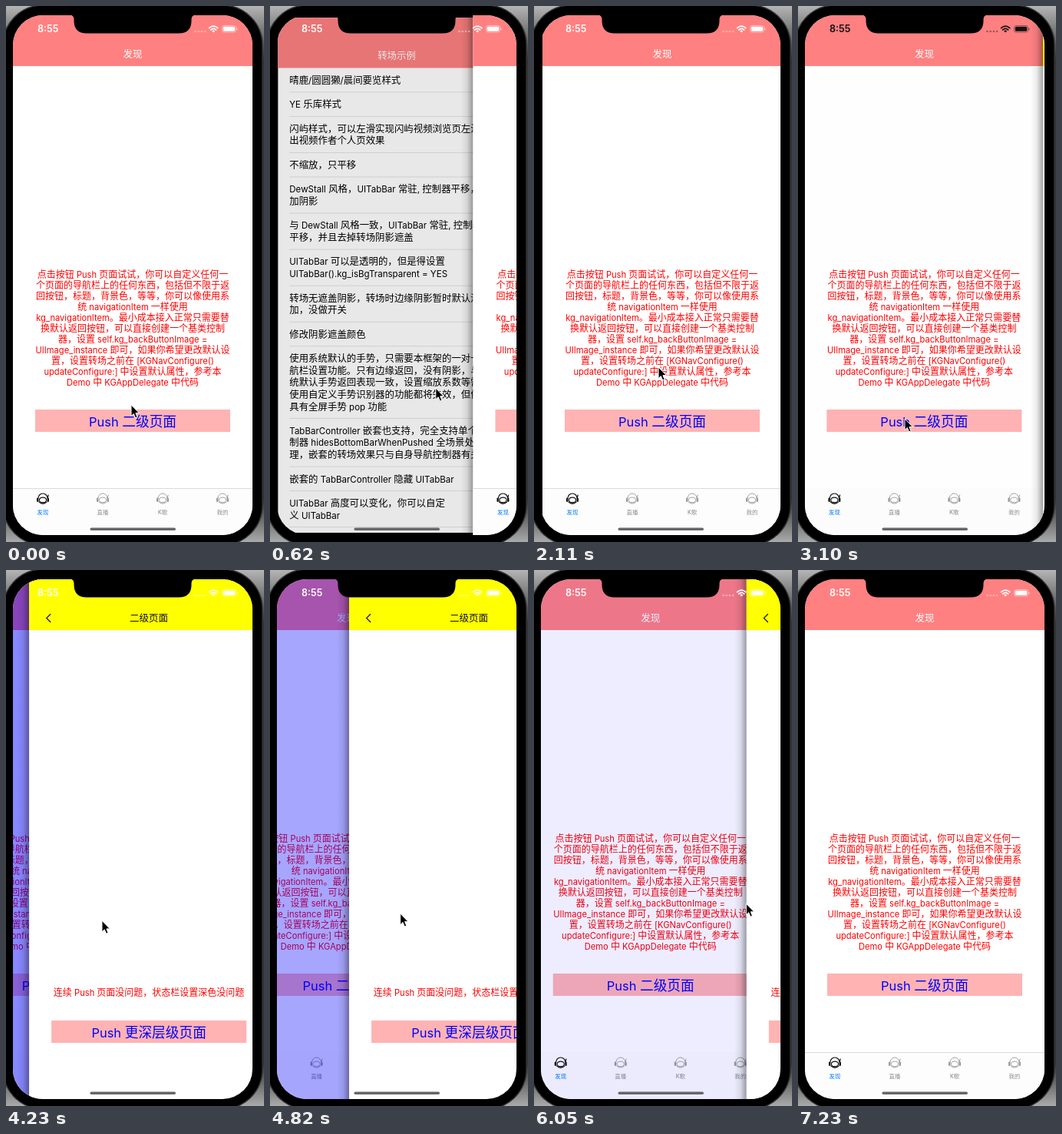
Recreate the animation shown at these times as an HTML page. Size 336 by 696 pixels, loop 7.33 s.

```html
<!DOCTYPE html>
<html lang="zh-CN">
<head>
<meta charset="utf-8">
<title>转场示例</title>
<style>
html, body { margin: 0; width: 100%; height: 100%; overflow: hidden; background: #333; }
svg { display: block; width: 336px; height: 696px; }
text { font-family: Inter, "Noto Sans CJK SC", "Noto Sans CJK", sans-serif; text-spacing-trim: space-all; white-space: pre; }
</style>
</head>
<body>
<svg id="stage" viewBox="0 0 336 696" xmlns="http://www.w3.org/2000/svg"></svg>
<script>
const LOOP = 7330, W = 312, PARALLAX = 0.3;
const RED = '#f00', CORAL = '#ff8080';

// ---- drawing helpers ----
const rect = (x, y, w, h, fill, more = '') =>
  `<rect x="${x}" y="${y}" width="${w}" height="${h}" fill="${fill}" ${more}/>`;

// y is the middle of the line; Latin runs are set a little smaller than Chinese
const text = (x, y, str, size, fill, more = 'text-anchor="middle"') => {
  const runs = str.replace(/[\x20-\x7e]+/g, m => `<tspan font-size="${size * 0.93}">${m}</tspan>`);
  return `<text x="${x}" y="${y + size * 0.37}" font-size="${size}" fill="${fill}" ${more}>${runs}</text>`;
};

const title = (str, fill) => text(165, 62, str, 12.5, fill, 'text-anchor="middle" font-weight="500"');
const line = (d, color, w) =>
  `<path d="${d}" fill="none" stroke="${color}" stroke-width="${w}" stroke-linecap="round" stroke-linejoin="round"/>`;
const button = (y, str) => rect(38, y, 254, 29, '#ffb3b3') + text(165, y + 15.2, str, 17.7, '#00f');

const page = (id, bar, shade, body) => `<g id="${id}">
  ${rect(-7, 12, 16, 675, 'url(#edge)')}
  ${rect(9, 12, W, 675, '#fff')}${rect(9, 12, W, 66, bar)}${body}
  ${rect(9, 12, W, 675, shade, `id="${id}Tint" opacity="0"`)}</g>`;

// ---- list page ----
const rows = [
  '晴鹿/圆圆獭/晨间要览样式',
  'YE 乐库样式',
  '闪屿样式，可以左滑实现闪屿视频浏览页左滑拉|出视频作者个人页效果',
  '不缩放，只平移',
  'DewStall 风格，UITabBar 常驻, 控制器平移，|加阴影',
  '与 DewStall 风格一致，UITabBar 常驻, 控制器|平移，并且去掉转场阴影遮盖',
  'UITabBar 可以是透明的，但是得设置|UITabBar().kg_isBgTransparent = YES',
  '转场无遮盖阴影，转场时边缘阴影暂时默认添|加，没做开关',
  '修改阴影遮盖颜色',
  '使用系统默认的手势，只需要本框架的一对一导|航栏设置功能。只有边缘返回，没有阴影，与系|统默认手势返回表现一致，设置缩放系数等需要|使用自定义手势识别器的功能都将失效，但依然|具有全屏手势 pop 功能',
  'TabBarController 嵌套也支持，完全支持单个控|制器 hidesBottomBarWhenPushed 全场景处|理，嵌套的转场效果只与自身导航控制器有关',
  '嵌套的 TabBarController 隐藏 UITabBar',
  'UITabBar 高度可以变化，你可以自定|义 UITabBar'
];
function listBody() {
  let y = 78, out = title('转场示例', '#fff');
  for (const row of rows) {
    const lines = row.split('|'), n = lines.length, h = 16.1 + 15.7 * n, mid = y + h / 2;
    lines.forEach((s, i) => out += text(24, mid + (i - (n - 1) / 2) * 15.9, s, 12.55, '#000', ''));
    out += line(`M301.3 ${mid - 4}l4 4l-4 4`, '#c4c4c6', 1.4);
    y += h;
    out += rect(24, y - 0.5, 297, 0.8, '#dcdcde');
  }
  return out;
}

// ---- home page ----
const intro = [
  '点击按钮 Push 页面试试，你可以自定义任何一',
  '个页面的导航栏上的任何东西，包括但不限于返',
  '回按钮，标题，背景色，等等，你可以像使用系',
  '统 navigationItem 一样使用',
  'kg_navigationItem。最小成本接入正常只需要替',
  '换默认返回按钮，可以直接创建一个基类控制',
  '器，设置 self.kg_backButtonImage =',
  'UIImage_instance 即可，如果你希望更改默认设',
  '置，设置转场之前在 [KGNavConfigure()',
  'updateConfigure:] 中设置默认属性，参考本',
  'Demo 中 KGAppDelegate 中代码'
];
function tab(name, i) {
  const x = 48 + i * 78, c = i ? '#999' : '#111', w = i ? 0.9 : 1.2;
  return `<g transform="translate(${x} 640)">
    ${line('M-6 -1A6 6 0 0 1 6 -1M-5 4Q0 8.5 5 4M6.2 -1L7.2 -5', c, w)}
    <ellipse cy="1.4" rx="4.6" ry="3.3" fill="none" stroke="${c}" stroke-width="${w}"/>
    ${[-8, 5.6].map(ear => rect(ear, -1.5, 2.4, 5.4, c, 'rx="1.2"')).join('')}</g>` +
    text(x, 657, name, 7.4, i ? '#8e8e93' : '#007aff', 'text-anchor="middle" font-weight="500"');
}
const homeBody = () => title('发现', '#fff') +
  intro.map((s, i) => text(165, 349 + i * 13.95, s, 12, RED)).join('') +
  button(524, 'Push 二级页面') +
  rect(9, 626, W, 61, '#fdfdfd') + rect(9, 626, W, 0.8, '#d4d4d6', 'id="tabLine"') +
  ['发现', '直播', 'K歌', '我的'].map(tab).join('');

// ---- second page ----
const nextBody = () => title('二级页面', '#111') + line('M36.6 57.5l-5 5l5 5', '#222', 1.3) +
  text(165, 549, '连续 Push 页面没问题，状态栏设置深色没问题', 12, RED) +
  button(585, 'Push 更深层级页面');

// ---- status bar ----
const statusBar = () => `<g id="status" fill="currentColor">
  <text x="41" y="34.3" font-size="12.6" font-weight="600">8:55</text>
  ${[0, 1, 2, 3].map(i => `<circle cx="${246.5 + i * 4.2}" cy="33" r="1.3" opacity=".4"/>`).join('')}
  ${line('M264.6 28.6Q270.2 23.6 275.8 28.6M266.7 31Q270.2 27.8 273.7 31', 'currentColor', 1.7)}
  <path d="M268.2 32.4Q270.2 30.8 272.2 32.4L270.2 34.6Z"/>
  ${rect(281.5, 25.5, 18, 8.6, 'none', 'rx="2.6" stroke="currentColor" stroke-width=".8" opacity=".55"')}
  ${rect(282.8, 26.8, 15.4, 6, 'currentColor', 'rx="1.5"')}
  ${rect(300.4, 28.4, 1.2, 3, 'currentColor', 'rx=".6" opacity=".55"')}</g>`;

const $ = id => document.getElementById(id);
$('stage').innerHTML = `<defs>
  <linearGradient id="edge"><stop offset="0" stop-opacity="0"/><stop offset=".5" stop-opacity=".08"/>
    <stop offset="1" stop-opacity=".35"/></linearGradient>
  <linearGradient id="desk" x2="0" y2="1"><stop offset="0" stop-color="#b4b4b4"/><stop offset=".1" stop-color="#333"/>
    <stop offset=".92" stop-color="#333"/><stop offset="1" stop-color="#aaa"/></linearGradient>
  <clipPath id="screen">${rect(9, 12, W, 675, '#000', 'rx="39"')}</clipPath></defs>
  ${rect(0, 0, 336, 696, 'url(#desk)')}
  ${rect(-4, -1, 338, 701, '#000', 'rx="52" stroke="#333" stroke-width="1.5"')}
  <g clip-path="url(#screen)">
    ${page('list', CORAL, '#000', listBody())}
    ${page('home', CORAL, '#00f', homeBody())}
    ${page('next', '#ff0', '#000', nextBody())}
    ${statusBar()}
    ${rect(109.5, 677.4, 111.5, 3.6, '#666', 'rx="1.8"')}
  </g>
  <path d="M83 11.5Q88.5 12 88.5 17.5V19Q88.5 35.5 105 35.5H225Q241.5 35.5 241.5 19V17.5Q241.5 12 247 11.5Z"/>
  <path id="cursor" d="M0 0V14.6L3.3 11.5L5.6 17L8.1 15.9L5.9 10.6H10.4Z" stroke="#fff" stroke-width="1" stroke-linejoin="round"/>`;

// ---- motion ----
const POP = 110, PUSH_HOME = 1840, PUSH_NEXT = 3100, DRAG = 4060, DROP = 6220;
const DRAG_X = 112, DRAG_GAIN = 1.63;

const part = (t, from, to) => Math.min(1, Math.max(0, (t - from) / (to - from)));
const outQuad = p => 1 - (1 - p) ** 2;
const inOut = p => p < 0.5 ? 4 * p ** 3 : 1 - 4 * (1 - p) ** 3;

// pointer moves: from, to, x, y
const moves = [
  [POP, 1000, 255, 480], [1000, 1360, 110, 393], [1360, 2110, 162, 469], [2290, 2890, 139, 536],
  [3540, DRAG, DRAG_X, 458], [DRAG, 5590, 228, 434], [5590, DROP, 294, 433], [6340, 6840, 311, 700]
];
const pointer = t => moves.reduce(([x, y], [from, to, x2, y2]) => {
  const p = part(t, from, to);
  return [x + (x2 - x) * p, y + (y2 - y) * p];
}, [163, 518]);

// a pushed page keeps 2 px from either end until it settles
function push(t, start) {
  if (t < start) return W;
  if (t >= start + 450) return 0;
  const x = W * (1 - inOut(part(t, start, start + 300)));
  return Math.min(W - 2, Math.max(2, x));
}
const homeX = t => t < 1400 ? W * outQuad(part(t, POP, 1000)) : push(t, PUSH_HOME);
function nextX(t, px) {
  if (t < DRAG) return push(t, PUSH_NEXT);
  return t < DROP ? DRAG_GAIN * (px - DRAG_X) : W;
}

const place = (id, transform) => $(id).setAttribute('transform', transform);
const show = (id, on) => $(id).setAttribute('visibility', on ? 'inherit' : 'hidden');
const tint = (id, a) => $(id + 'Tint').setAttribute('opacity', a);

function draw(t) {
  const [px, py] = pointer(t), a = homeX(t), b = nextX(t, px);
  const overList = 1 - a / W, overHome = 1 - b / W;
  place('list', `translate(165 349.5) scale(${1 - 0.05 * overList}) translate(-165 -349.5)`);
  place('home', `translate(${a - PARALLAX * W * overHome})`);
  place('next', `translate(${b})`);
  place('cursor', `translate(${px} ${py})`);
  tint('list', overList / 2);
  tint('home', overHome / 2);
  show('home', a < W);
  show('next', b < W);
  show('tabLine', b >= W);
  $('status').setAttribute('color', t >= PUSH_NEXT && t < DRAG ? '#111' : '#fff');
}

const start = performance.now();
function tick() {
  draw((performance.now() - start) % LOOP);
  requestAnimationFrame(tick);
}
tick();
</script>
</body>
</html>
```
